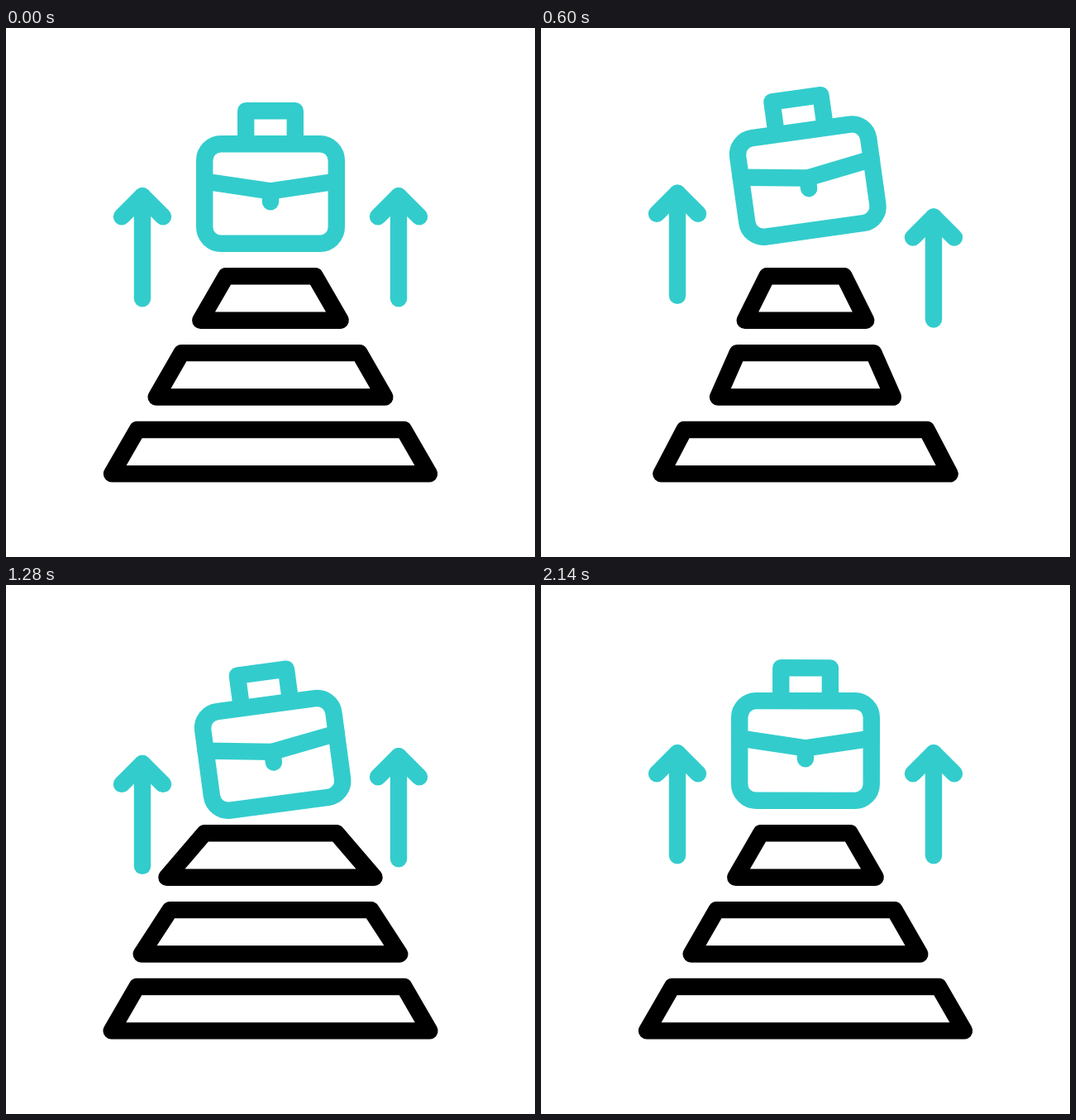
Animation, 640 px wide and 640 px high, one loop 2400 ms. Source, as an HTML page with a canvas:

```html
<!DOCTYPE html>
<html lang="en">
<head>
<meta charset="utf-8">
<title>Career pyramid</title>
<style>
html, body { margin: 0; width: 100%; height: 100%; overflow: hidden; background: #fff; }
canvas { display: block; width: 100vmin; height: 100vmin; }
</style>
</head>
<body>
<canvas id="stage"></canvas>
<script>
const LOOP = 2400, STEP = 20, SIZE = 640, MID = SIZE / 2;
const TEAL = '#33cccc', BLACK = '#000', WHITE = '#fff', LINE = 20.4;
const canvas = document.getElementById('stage');
const ctx = canvas.getContext('2d');

const ease = p => (1 - Math.cos(Math.PI * Math.min(1, Math.max(0, p)))) / 2;

// Starts at zero and swings through the peaks; each beat may be a little shorter than the last.
function swing(t, peaks, beat, shrink = 0) {
  const time = k => beat * k - shrink * k * k;
  let value = 0;
  peaks.forEach((peak, k) => {
    value += (peak - value) * ease((t - time(k)) / (time(k + 1) - time(k)));
  });
  return value;
}

function polyline(points, closed) {
  ctx.beginPath();
  points.forEach(([x, y]) => ctx.lineTo(x, y));
  if (closed) ctx.closePath();
  ctx.stroke();
}

// Layers are counted from the bottom; each narrows, widens and settles later than the one below.
function drawLayer(i, t) {
  const y = 486 - 92.85 * i, low = y + 53.4;
  const bottom = 192 - 53.65 * i, top = bottom - 30.8;
  const start = 155 * i, narrow = 400 + 220 * i, wide = 932 + 140 * i, beat = 370;
  const min = 0.765, max = 1 + 44.5 / bottom;
  const s = 1 + (min - 1) * ease((t - start) / (narrow - start))
    + (max - min) * ease((t - narrow) / (wide - narrow))
    + (1 - max) * ease((t - wide) / beat);
  ctx.strokeStyle = BLACK;
  polyline([[MID - top * s, y], [MID + top * s, y], [MID + bottom * s, low], [MID - bottom * s, low]], true);
}

function drawArrow(x, t) {
  const y = 203.2 + swing(t, [25.5, -49.5, 14, -27, 0], 430, 6);
  ctx.strokeStyle = TEAL;
  polyline([[x, y], [x, y + 124]]);
  polyline([[x - 25, y + 25], [x, y], [x + 25, y + 25]]);
}

function roundedBox(x, y, w, h, r) {
  ctx.beginPath();
  ctx.moveTo(x + r, y);
  ctx.arcTo(x + w, y, x + w, y + h, r);
  ctx.arcTo(x + w, y + h, x, y + h, r);
  ctx.arcTo(x, y + h, x, y, r);
  ctx.arcTo(x, y, x + w, y, r);
  ctx.closePath();
}

// Drawn around its own centre, which is also the pivot.
function drawBag(t) {
  const lift = swing(t, [53, -35, 53, -20, 11, 0], 355);
  const turn = swing(t, [-18.1, 14.1, -7.8, 4.2, 0], 435);
  ctx.save();
  ctx.translate(MID, 180.5 + lift);
  ctx.rotate(turn * Math.PI / 180);
  ctx.strokeStyle = TEAL;
  ctx.fillStyle = WHITE;
  polyline([[-29.8, -40], [-29.8, -80.2], [29.8, -80.2], [29.8, -40]]);
  roundedBox(-79.8, -40.3, 159.6, 120.6, 20);
  ctx.fill();
  ctx.stroke();
  polyline([[-79.8, 5], [0, 16.9], [79.8, 5]]);
  polyline([[0, 16.9], [0, 29.7]]);
  ctx.restore();
}

function draw(t) {
  const px = Math.round(Math.min(innerWidth, innerHeight) * (devicePixelRatio || 1)) || SIZE;
  if (canvas.width !== px) canvas.width = canvas.height = px;
  ctx.setTransform(px / SIZE, 0, 0, px / SIZE, 0, 0);
  ctx.fillStyle = WHITE;
  ctx.fillRect(0, 0, SIZE, SIZE);
  ctx.lineWidth = LINE;
  ctx.lineCap = ctx.lineJoin = 'round';
  for (let i = 0; i < 3; i++) drawLayer(i, t);
  drawArrow(165, t);
  drawArrow(475, (t - 170) / 0.98);
  drawBag(t);
}

const start = performance.now();
function tick() {
  const t = (performance.now() - start) % LOOP;
  draw(Math.floor(t / STEP) * STEP);
  requestAnimationFrame(tick);
}
tick();
</script>
</body>
</html>
```
